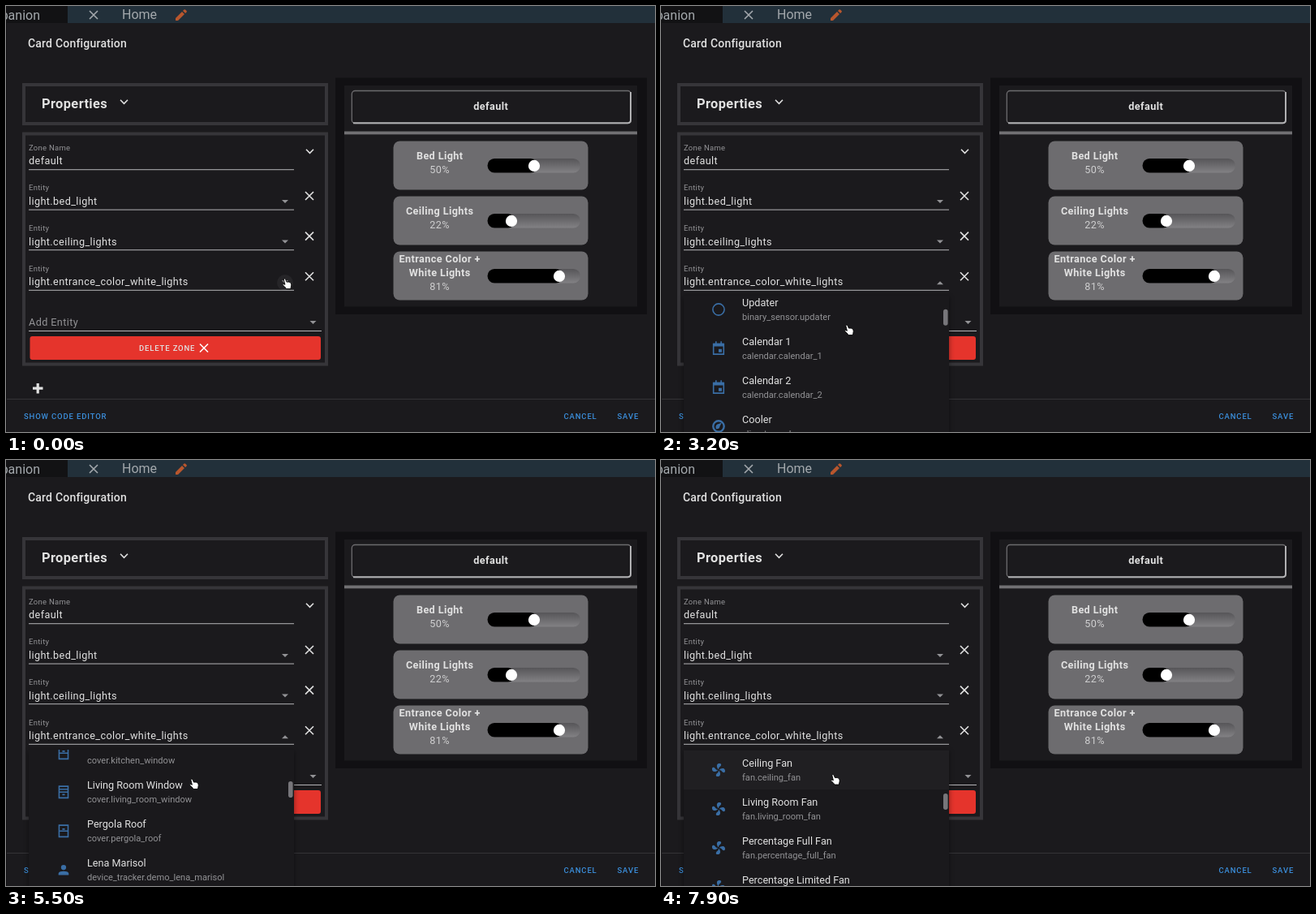
An HTML page that plays this animation: 800 px wide and 525 px high, repeating every 8000 ms.

```html
<!DOCTYPE html>
<html lang="en">
<head>
<meta charset="utf-8">
<title>Card configuration</title>
<style>
  html, body { margin: 0; width: 100%; height: 100%; overflow: hidden; background: #1b1a1d; }
  svg { display: block; width: 100vw; height: 100vh; }
  text { font-family: Roboto, sans-serif; fill: #e1e1e1; white-space: pre; }
  .field { font-size: 12.65px; letter-spacing: .4px; }
  .label { font-size: 9.5px; letter-spacing: .27px; fill: #929295; }
  .hint { fill: #929295; }
  .bold { font-weight: 700; }
  .mid { text-anchor: middle; }
  .button { font-size: 9.5px; font-weight: 500; letter-spacing: .85px; }
  .link { fill: #3b8fdc; }
  .name { font-size: 12.65px; }
  .id { font-size: 11.1px; fill: #929295; }
  .bar { font-size: 16px; fill: #a3a8ac; }
  .line { fill: none; stroke: #e1e1e1; stroke-width: 1.6; }
  .icon { fill: none; stroke: #3a6ea5; stroke-width: 2; }
  .icon .solid { fill: #3a6ea5; stroke: none; }
</style>
</head>
<body>
<svg id="stage" viewBox="0 0 800 525" preserveAspectRatio="none"></svg>
<script>
const LOOP = 8000, STEP = 100, ROW = 48, LIST_TOP = 358;

const fanBlade = '<path class="solid" d="M12 11C9 9 8 3 12 2C17 1 17 5 14 7Q12 8 12 11Z"/>';
const windowFrame = '<path d="M5 3H19V21H5ZM5 12H19';
const icons = {
  air: '<path d="M7 3H20V21H7ZM7 7.5H20M7 12H20M7 16.5H20M2 6H7M2 12H7M2 18H7"/>',
  bell: '<path d="M4 19H20L18 16.500V11Q18 5 12 5T6 11V16.500ZM12 5V2M10 22H14"/>',
  dry: '<path class="solid" d="M12 3Q19 11 18 16L8 7ZM6.500 10L17 20Q12 23 8 20Q4 16 6.500 10Z"/><path d="M3 4L21 22"/>',
  run: '<circle class="solid" cx="15" cy="4" r="2.200"/><path d="M6 12V9L12 7L10 14L14 17V23M10 14L8 18L3 17M12 7L15 11H19"/>',
  ring: '<circle cx="12" cy="12" r="9"/>',
  calendar: '<path d="M4 5H20V21H4ZM8 1V5M16 1V5"/><path class="solid" d="M4 4H20V9H4ZM12 13H17V18H12Z"/>',
  thermostat: '<circle cx="12" cy="12" r="8.500" stroke-width="3"/><path d="M8 16Q6 9 13 8L17 6L14 12Q13 17 8 16Z" class="solid"/>',
  garage: '<path d="M4 21V8L12 4L20 8V21M7 11H17M7 14H17M7 17H17M7 20H17"/>',
  open: windowFrame + 'M5 7.500H19M10 16H14"/>',
  closed: windowFrame + 'M10 9H14"/>',
  person: '<circle class="solid" cx="12" cy="8" r="4"/><path class="solid" d="M4 20V18Q4 14 12 14T20 18V20Z"/>',
  fan: [0, 90, 180, 270].map(a => `<g transform="rotate(${a} 12 12)">${fanBlade}</g>`).join('')
};

const entities = [
  ['Demo Air Quality Home', 'air_quality', 'air', 'demo_air_quality_home'],
  ['Demo Air Quality Office', 'air_quality', 'air', 'demo_air_quality_office'],
  ['Alarm', 'alarm_control_panel', 'bell'],
  ['Basement Floor Wet', 'binary_sensor', 'dry'],
  ['Movement Backyard', 'binary_sensor', 'run'],
  ['Updater', 'binary_sensor', 'ring'],
  ['Calendar 1', 'calendar', 'calendar'],
  ['Calendar 2', 'calendar', 'calendar'],
  ['Cooler', 'climate', 'thermostat'],
  ['Heatpump', 'climate', 'thermostat'],
  ['Hvac', 'climate', 'thermostat'],
  ['Garage Door', 'cover', 'garage'],
  ['Hall Window', 'cover', 'open'],
  ['Kitchen Window', 'cover', 'closed'],
  ['Living Room Window', 'cover', 'open'],
  ['Pergola Roof', 'cover', 'closed'],
  ['Lena Marisol', 'device_tracker', 'person', 'demo_lena_marisol'],
  ['Home Boy', 'device_tracker', 'person', 'demo_home_boy'],
  ['Dorian', 'device_tracker', 'person', 'demo_dorian'],
  ['Ceiling Fan', 'fan', 'fan'],
  ['Living Room Fan', 'fan', 'fan'],
  ['Percentage Full Fan', 'fan', 'fan'],
  ['Percentage Limited Fan', 'fan', 'fan']
];

const text = (x, y, cls, s, extra = '') => `<text x="${x}" y="${y}" class="${cls}" ${extra}>${s}</text>`;
const rect = (x, y, w, h, fill, r = 0, extra = '') =>
  `<rect x="${x}" y="${y}" width="${w}" height="${h}" rx="${r}" fill="${fill}" ${extra}/>`;
const path = (d, extra = '') => `<path class="line" d="${d}" ${extra}/>`;
const cross = (x, y, extra) => path(`M${x - 5} ${y - 5}l10 10m0 -10l-10 10`, extra);
const chevron = (x, y) => path(`M${x - 4.5} ${y - 2.2}l4.500 4.500l4.500 -4.500`);
const arrow = (x, y, extra = '') => `<path d="M${x - 4} ${y - 2}h8l-4 4z" fill="#929295" ${extra}/>`;
const underline = (y, end) => rect(28, y, end - 28, 1, '#b4b4b6');
const panel = (y, h) => rect(22, y + 2, 373, h - 4, 'none', 0, 'stroke="#363539" stroke-width="4"');

function entityField(id, i) {
  const y = i * 49.6;
  return text(28, 227.3 + y, 'label', 'Entity') + text(28, 245 + y, 'field', id) + underline(250.6 + y, 355) +
    arrow(344, 241 + y, i === 2 ? 'id="arrow"' : '') + cross(374, 234 + y);
}

function lightCard(lines, value, i) {
  const y = 166.5 + i * 68, knob = 601 + value, first = lines.length > 1 ? 13.5 : 22.5;
  return rect(477.5, y, 240, 60, '#6d6c6f', 8) +
    lines.map((s, n) => text(534.7, y + first + n * 17, 'field bold mid', s)).join('') +
    text(534.7, y + first + lines.length * 17, 'field mid', value + '%', 'style="fill:#cfcfd0"') +
    rect(593.5, y + 21.5, 114.5, 17.5, 'url(#groove)', 8.7) +
    rect(593.5, y + 21.5, knob - 589, 17.5, '#000', 8.7) +
    `<circle cx="${knob}" cy="${y + 30.4}" r="7.100" fill="#fff"/>`;
}

function listItem([name, domain, icon, id], i) {
  const y = i * ROW;
  return `<g class="icon" transform="translate(61.500 ${y + 14.5}) scale(.79)">${icons[icon]}</g>` +
    text(100, y + 19.6, 'name', name) +
    text(100, y + 37.2, 'id', domain + '.' + (id || name.toLowerCase().replace(/ /g, '_')));
}

stage.innerHTML = `
<defs>
  <linearGradient id="groove" x2="0" y2="1"><stop stop-color="#565558"/><stop offset="1" stop-color="#828184"/></linearGradient>
  <clipPath id="listArea"><rect x="28" y="357" width="327" height="168"/></clipPath>
</defs>` +
  rect(0, 0, 800, 525, '#121214') + rect(76, 0, 724, 21, '#22303a') + rect(1, 21, 799, 504, '#1b1a1d') +
  text(42, 16.5, 'bar', 'panion', 'text-anchor="end"') + cross(108, 11, 'style="stroke:#a3a8ac"') +
  text(143, 15.5, 'bar', 'Home') +
  '<path d="M209 18v-3l8 -8l3 3l-8 8zM218 6l1.500 -1.500q1 -.6 1.800 .2l1.300 1.300q.7 .8 0 1.600l-1.500 1.500z" fill="#b8562d"/>' +
  text(27, 51.3, '', 'Card Configuration', 'font-size="14" font-weight="500" letter-spacing=".2"') +

  panel(95, 52) + text(44, 125.5, 'bold', 'Properties', 'font-size="16.4" letter-spacing=".4"') + chevron(145.5, 118) +
  panel(155.5, 288) +
  text(28, 177.8, 'label', 'Zone Name') + text(28, 195.3, 'field', 'default') + underline(201.2, 355) + chevron(374.5, 179) +
  ['light.bed_light', 'light.ceiling_lights', 'light.entrance_color_white_lights'].map(entityField).join('') +
  text(28, 394.2, 'field hint', 'Add Entity') + underline(400, 389) + arrow(378.5, 390) +
  rect(29.5, 407, 358.5, 29, '#e5342c', 3) + text(164, 424.6, 'button', 'DELETE ZONE') + cross(244, 421.5, 'style="stroke:#fff"') +
  path('M33 471.200h12.500M39.200 465v12.500', 'style="stroke-width:3.200"') +
  rect(1, 484, 799, 1, '#343337') +
  text(22, 509, 'button link', 'SHOW CODE EDITOR') + text(687.5, 509, 'button link', 'CANCEL') + text(753.5, 509, 'button link', 'SAVE') +

  rect(406, 88.5, 384, 291.5, '#111013') + rect(417, 98, 361, 272.5, '#1b1a1d') +
  rect(426.3, 104.5, 344, 40, 'none', 4, 'stroke="#6c6b6e" stroke-width="1.300"') +
  path('M770 106V140.500Q770 144.200 766.300 144.200H428', 'style="stroke:#b0b0b2;stroke-width:2"') +
  text(597.7, 128.3, 'field bold mid', 'default') + rect(417, 154.5, 361, 3.8, '#717073') +
  [[['Bed Light'], 50], [['Ceiling Lights'], 22], [['Entrance Color +', 'White Lights'], 81]]
    .map(([lines, value], i) => lightCard(lines, value, i)).join('') +

  '<circle id="ripple" cx="344" cy="341" r="10" fill="#fff"/><g id="dropdown">' +
  rect(28, 357, 327, 180, '#1a191c', 0, 'style="filter:drop-shadow(0 2px 3px rgba(0,0,0,.45))"') +
  '<g clip-path="url(#listArea)">' + rect(28, LIST_TOP, 327, ROW, '#201f22', 0, 'id="hover"') +
  `<g id="list">${entities.map(listItem).join('')}</g></g>` +
  rect(348, 0, 5.6, 20, '#77767a', 2.8, 'id="thumb"') + '</g>' +
  `<path id="pointer" fill="#fff" stroke="#000" stroke-width=".9" stroke-linejoin="round"
    d="M-3.800 -5.500q1.300 -1.200 2.400 .3l1.300 3.300q3.200 -.6 5.200 1q1.300 2.800 .2 5.300l-.4 2.200h-5.300q-1.700 -2.800 -4.700 -4.800q-.2 -1.800 2 -.9l1 .4z"/>`;

const part = Object.fromEntries(['arrow', 'ripple', 'dropdown', 'hover', 'list', 'thumb', 'pointer']
  .map(id => [id, document.getElementById(id)]));

// Each track is a list of [time, value] points.
const scrollTrack = [[1800, 0], [2100, 57.5], [3200, 248], [4900, 549], [6000, 724.5], [6300, 775],
  [6500, 775], [6700, 841.5], [7100, 884], [7200, 884], [7700, 912]];
const pointerX = [[1200, 346], [1700, 231.5], [7400, 231.5], [7900, 214.5]];
const pointerY = [[1200, 342], [1700, 399], [7400, 399], [7900, 393.5]];
const linear = k => k, smooth = k => k * k * (3 - 2 * k);

function sample(track, t, ease) {
  const next = track.findIndex(p => p[0] > t);
  if (next === 0) return track[0][1];
  if (next < 0) return track[track.length - 1][1];
  const [t0, a] = track[next - 1], [t1, b] = track[next];
  return a + (b - a) * ease((t - t0) / (t1 - t0));
}

function draw(now) {
  const t = Math.floor(now % LOOP / STEP) * STEP;
  const open = t >= 400, scroll = sample(scrollTrack, t, linear);
  const x = sample(pointerX, t, smooth), y = sample(pointerY, t, smooth);
  part.dropdown.style.display = open ? '' : 'none';
  part.arrow.setAttribute('transform', open ? 'rotate(180 344 340.700)' : '');
  part.ripple.setAttribute('opacity', t < 300 ? .05 : Math.max(0, .14 * (1 - (t - 300) / 600)));
  part.hover.style.display = (y > LIST_TOP && t <= 1800) || t >= 7700 ? '' : 'none';
  part.list.setAttribute('transform', `translate(0 ${LIST_TOP - scroll})`);
  part.thumb.setAttribute('y', 359.8 + scroll * .0562);
  part.pointer.setAttribute('transform', `translate(${x} ${y})`);
  requestAnimationFrame(() => draw(performance.now() - start));
}
const start = performance.now();
draw(0);
</script>
</body>
</html>
```
